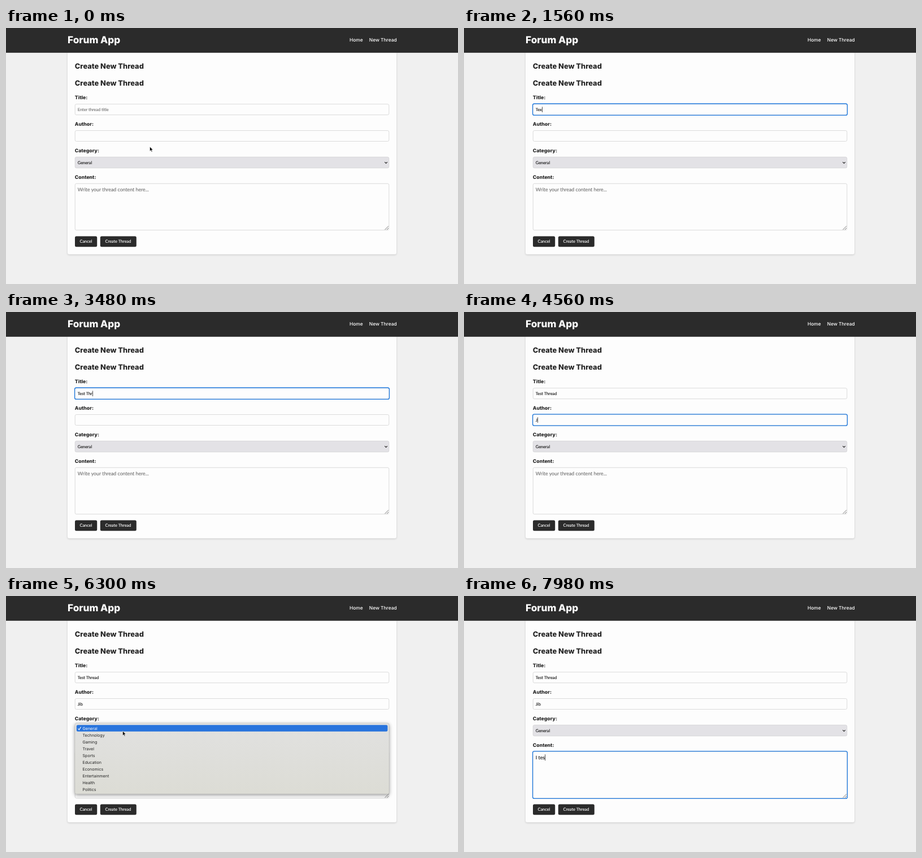
Write an HTML page that moves like this. It is 800 px wide and 453 px high and loops after 8 s.

```html
<!DOCTYPE html>
<html lang="en">
<head>
<meta charset="utf-8">
<title>Forum App</title>
<style>
  html, body { margin: 0; width: 100%; height: 100%; overflow: hidden; background: #f0f0f0; }
  svg { display: block; width: 100%; height: 100%; }
  text { text-rendering: geometricPrecision; white-space: pre; }
  .ui { font-family: Inter, Roboto, sans-serif; fill: #242424; }
  .body {
    font-family: Lato, "Open Sans", sans-serif; font-size: 7.4px;
    color: #111; fill: currentColor; stroke: currentColor; stroke-width: .12;
  }
  .large { font-size: 8.8px; }
  .logo { font-size: 17.2px; font-weight: 800; fill: #fff; }
  .nav { font-size: 8.4px; font-weight: 500; fill: #fff; }
  .head { font-size: 12.85px; font-weight: 800; }
  .label { font-size: 8.7px; font-weight: 800; }
  .hint { font-size: 6.5px; fill: #e6e6e6; }
  .option { font-size: 7.1px; fill: #222; }
  .chosen { fill: #fff; }
  .light { color: #fff; }
  .grey { color: #707070; }
  .card { fill: #fdfdfd; filter: drop-shadow(0 1px 1.5px rgba(0,0,0,.17)); }
  .field { fill: #fdfdfd; stroke: #cdcdcd; stroke-width: .7; }
  .select { fill: #e3e2e6; stroke: #cfcfd2; stroke-width: .7; }
  .button { fill: #2b2b2b; }
  .ring { fill: none; stroke: #1f7ae0; stroke-width: 1.3; }
  .caret { fill: #111; }
  .dark { fill: #1a1a1a; filter: drop-shadow(0 1.5px 2.2px rgba(0,0,0,.35)); }
  .popup { fill: url(#popupFill); stroke: #b9b9b6; stroke-width: .5; filter: drop-shadow(0 2px 3px rgba(0,0,0,.38)); }
</style>
</head>
<body>
<svg id="stage" viewBox="0 0 800 453" xmlns="http://www.w3.org/2000/svg">
  <defs>
    <linearGradient id="popupFill" x1="0" y1="0" x2="0" y2="1">
      <stop offset="0" stop-color="#e1e1e0"/>
      <stop offset="1" stop-color="#dcdcd5"/>
    </linearGradient>
  </defs>
</svg>
<script>
const LOOP = 8000, STEP = 60;
const stage = document.getElementById('stage');

function add(tag, attrs, parent = stage) {
  const node = document.createElementNS('http://www.w3.org/2000/svg', tag);
  for (const key in attrs) node.setAttribute(key, attrs[key]);
  return parent.appendChild(node);
}
const group = () => add('g', {});
const box = (cls, x, y, w, h, rx = 2.5, parent) =>
  add('rect', { class: cls, x, y, width: w, height: h, rx }, parent);
function label(cls, x, y, str, parent) {
  const node = add('text', { class: cls, x, y }, parent);
  node.textContent = str;
  return node;
}
const show = (node, on) => { node.style.display = on ? '' : 'none'; };

// Page
box('card', 109, 30, 582, 370.4, 3);
add('rect', { width: 800, height: 43.8, fill: '#2b2b2b' });
label('ui logo', 109, 27.3, 'Forum App');
label('ui nav', 608, 24.2, 'Home');
label('ui nav', 642.8, 24.2, 'New Thread');
label('ui head', 121.8, 72, 'Create New Thread');
label('ui head', 121.8, 101.8, 'Create New Thread');
['Title:', 'Author:', 'Category:', 'Content:'].forEach((name, i) =>
  label('ui label', 121.8, 126.3 + i * 46.8, name));

// Form controls
const focusRing = (y, h) => box('ring', 121.5, y - .4, 557, h + .8, 3);
function makeField(y, h, baseline, size, hint) {
  box('field', 122.2, y + .3, 555.6, h - .6);
  const placeholder = label('body grey' + size, 126.8, baseline, hint);
  const value = label('body' + size, 126.8, baseline, '');
  const ring = focusRing(y, h);
  const caretH = size ? 11 : 9.6;
  const caret = box('caret', 127, baseline - caretH + 2.3, .75, caretH, 0);
  return { placeholder, value, ring, caret };
}
const title = makeField(134.4, 19.6, 146.8, '', 'Enter thread title');
const author = makeField(181.2, 19.6, 193.6, '', '');
box('select', 122.2, 228.3, 555.6, 19.4);
label('body', 126.8, 240.6, 'General');
add('path', { d: 'M670.3 237.1l2.3 2.4 2.3-2.4', fill: 'none', stroke: '#222', 'stroke-width': 1.1 });
const selectRing = focusRing(228, 20);
const content = makeField(275, 83, 289, ' large', 'Write your thread content here...');
add('path', { d: 'M670.5 357l6.5-6.5M674 357l3-3', stroke: '#555', 'stroke-width': .8 });
box('button', 122, 368.5, 39.2, 18.8);
box('button', 166.8, 368.5, 64, 18.8);
label('body light', 130.5, 380.4, 'Cancel');
label('body light', 175.5, 380.4, 'Create Thread');

// Suggestion lists
function makeHints(y, h, names) {
  const g = group();
  box('dark', 122.3, y, 555.4, h, 3, g);
  names.forEach((name, i) => label('ui hint', 125, y + 8.3 + i * 10.9, name, g));
  return g;
}
const titleHints = makeHints(154.2, 65.6,
  ['The Fern of Elm', 'tin fable', 'the jug', 'torvane', 'Tin Fable', 'the tilewasher']);
add('rect', { x: 672.8, y: 155.4, width: 3.6, height: 21, rx: 1.6, fill: '#686868' }, titleHints);
const authorHints = makeHints(202, 12, ['Jib']);

// Category menu
const menu = group();
box('popup', 121.9, 225, 556.2, 125.3, 3, menu);
add('rect', { x: 124.8, y: 228.2, width: 550.6, height: 11.6, rx: 2.4, fill: '#2874dd' }, menu);
add('path', { d: 'M127.6 234.5l1.8 2.3 3.2-5', fill: 'none', stroke: '#fff', 'stroke-width': 1.1 }, menu);
['General', 'Technology', 'Gaming', 'Travel', 'Sports', 'Education', 'Economics',
  'Entertainment', 'Health', 'Politics'].forEach((name, i) =>
  label('ui option' + (i ? '' : ' chosen'), 135.5, 236.6 + i * 12, name, menu));

const pointer = add('path', {
  d: 'M0 0V8L1.9 6.3 3.2 9.3 4.5 8.7 3.2 5.8H5.7Z',
  fill: '#000', stroke: '#fff', 'stroke-width': .6
});

// Timeline: [time, value]
const titleSteps = [
  [0, ''], [1080, 'T'], [1320, 'Te'], [1500, 'Tex'], [1680, 'Text'], [1800, 'Text '],
  [1920, 'Text T'], [2100, 'Text '], [2160, 'Text'], [2220, 'Tex'], [2280, 'Te'],
  [2340, 'T'], [2400, ''], [2640, 'T'], [2880, 'Te'], [3000, 'Tes'], [3060, 'Test'],
  [3180, 'Test '], [3300, 'Test T'], [3360, 'Test Th'], [3480, 'Test Thr'],
  [3600, 'Test Thre'], [3660, 'Test Threa'], [3780, 'Test Thread']
];
const authorSteps = [[0, ''], [4320, 'J'], [4620, 'Ji'], [4680, 'Jib']];
const contentSteps = [[0, ''], [7440, 'I'], [7500, 'I '], [7620, 'I t'], [7800, 'I te'], [7920, 'I tes']];
const focusSteps = [[0, null], [360, title], [4080, author], [4860, selectRing], [5640, null], [7140, content]];
const listSteps = [[0, null], [1140, titleHints], [1440, null], [2700, titleHints], [2940, null],
  [4380, authorHints], [4560, null], [4680, authorHints], [4860, null], [5700, menu], [6660, null]];
const MENU_FADE = [6480, 6660];

// Pointer paths: [time, x, y]
const moves = [
  [[0, 254.5, 210], [60, 254.5, 210], [360, 236, 147], [1080, 236, 147]],
  [[5160, 234, 163], [5580, 214, 236], [6300, 206.5, 239],
    [6840, 206.5, 239], [7140, 200, 300], [7440, 200, 300]]
];

function at(steps, t) {
  let value;
  for (const [time, v] of steps) if (time <= t) value = v;
  return value;
}

function setField(field, str, focused) {
  field.value.textContent = str.replace(/ /g, '\u00a0');
  show(field.placeholder, !str);
  show(field.ring, focused);
  show(field.caret, focused);
  const width = str ? field.value.getComputedTextLength() : 0;
  field.caret.setAttribute('x', 127 + width);
}

function setPointer(t) {
  const path = moves.find(p => t >= p[0][0] && t < p[p.length - 1][0]);
  show(pointer, path);
  if (!path) return;
  const i = path.findIndex(p => p[0] > t);
  const [t0, x0, y0] = path[i - 1], [t1, x1, y1] = path[i];
  const k = (t - t0) / (t1 - t0), e = k * k * (3 - 2 * k);
  pointer.setAttribute('transform', `translate(${x0 + (x1 - x0) * e} ${y0 + (y1 - y0) * e})`);
}

function draw() {
  const t = Math.floor((performance.now() % LOOP) / STEP) * STEP;
  const focus = at(focusSteps, t), list = at(listSteps, t);
  setField(title, at(titleSteps, t), focus === title);
  setField(author, at(authorSteps, t), focus === author);
  setField(content, at(contentSteps, t), focus === content);
  show(selectRing, focus === selectRing);
  [titleHints, authorHints, menu].forEach(g => show(g, g === list));
  const [from, to] = MENU_FADE;
  menu.style.opacity = Math.min(1, Math.max(0, (to - t) / (to - from)));
  setPointer(t);
  requestAnimationFrame(draw);
}
draw();
</script>
</body>
</html>
```
